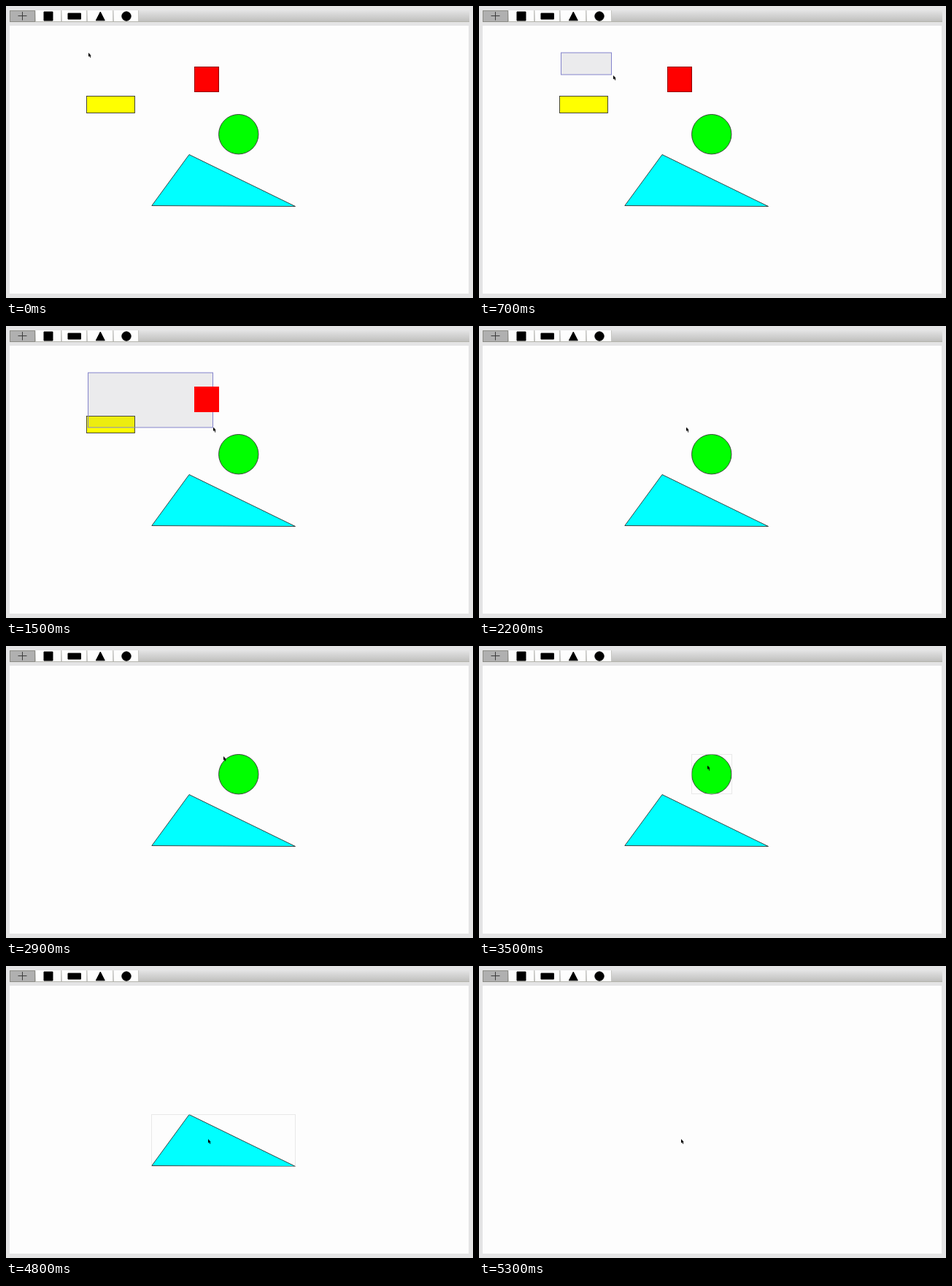
Recreate the animation shown at these times as an HTML page. Size 640x400 px, loop 5500 ms.

```html
<!DOCTYPE html>
<html lang="en">
<head>
<meta charset="utf-8">
<title>Shape editor</title>
<style>
html, body { margin: 0; width: 100%; height: 100%; overflow: hidden; background: #e4e4e5; }
svg { display: block; width: 640px; height: 400px; }

.shape { stroke: #333; stroke-width: .9; }
.frame { fill: none; stroke: #d4d4d4; stroke-dasharray: 1 1; }
.band { fill: rgba(110, 110, 120, .12); stroke: #8484cc; }

/* Every change is a hard step on a 100 ms grid. */
.anim { animation: 5500ms step-end infinite; }
#cursor { animation-name: move; }
#band { animation-name: drag; }
#redEdge { animation-name: edge; }
#pair { animation-name: pair; }
#pairFrames { animation-name: pairFrames; }
#disc { animation-name: disc; }
#discFrame { animation-name: discFrame; }
#tri { animation-name: tri; }
#triFrame { animation-name: triFrame; }

@keyframes move {
  0%     { transform: translate(113px, 64px); }
  7.27%  { transform: translate(115px, 65px); }
  9.09%  { transform: translate(127px, 70px); }
  10.9%  { transform: translate(152px, 81px); }
  12.72% { transform: translate(184px, 95px); }
  14.54% { transform: translate(217px, 109px); }
  16.36% { transform: translate(246px, 122px); }
  18.18% { transform: translate(269px, 132px); }
  20%    { transform: translate(280px, 137px); }
  21.81% { transform: translate(284px, 138.5px); }
  49.09% { transform: translate(285px, 140px); }
  50.9%  { transform: translate(290px, 144px); }
  52.72% { transform: translate(298px, 151px); }
  54.54% { transform: translate(306px, 158px); }
  56.36% { transform: translate(311px, 162px); }
  58.18% { transform: translate(313px, 163.5px); }
  74.54% { transform: translate(309px, 174px); }
  76.36% { transform: translate(300px, 196px); }
  78.18% { transform: translate(290px, 215px); }
  80%    { transform: translate(281px, 230px); }
  81.81% { transform: translate(278px, 236px); }
  83.63%, 100% { transform: translate(277px, 237px); }
}
@keyframes drag {
  0%     { visibility: hidden; width: 0; height: 0; }
  7.27%  { visibility: visible; width: 1px; height: 1px; }
  9.09%  { visibility: visible; width: 12px; height: 5px; }
  10.9%  { visibility: visible; width: 37px; height: 16px; }
  12.72% { visibility: visible; width: 69px; height: 30px; }
  14.54% { visibility: visible; width: 102px; height: 44px; }
  16.36% { visibility: visible; width: 131px; height: 57px; }
  18.18% { visibility: visible; width: 154px; height: 67px; }
  20%    { visibility: visible; width: 166px; height: 72px; }
  21.81% { visibility: visible; width: 171px; height: 75px; }
  29.09%, 100% { visibility: hidden; width: 0; height: 0; }
}
@keyframes edge { 0% { stroke: #900000; } 18.18%, 100% { stroke: #f00; } }
@keyframes pair { 0% { opacity: 1; } 40%, 100% { opacity: 0; } }
@keyframes pairFrames { 0% { opacity: 0; } 29.09% { opacity: 1; } 40%, 100% { opacity: 0; } }
@keyframes disc { 0% { opacity: 1; } 70.9%, 100% { opacity: 0; } }
@keyframes discFrame { 0% { opacity: 0; } 63.63%, 100% { opacity: 1; } }
@keyframes tri { 0% { opacity: 1; } 96.36%, 100% { opacity: 0; } }
@keyframes triFrame { 0% { opacity: 0; } 83.63%, 100% { opacity: 1; } }
</style>
</head>
<body>
<svg viewBox="0 0 640 400">
  <defs>
    <linearGradient id="bar" x2="0" y2="1">
      <stop offset="0" stop-color="#e6e6e7"/>
      <stop offset="1" stop-color="#bdbdbb"/>
    </linearGradient>
  </defs>

  <rect width="640" height="400" fill="#e4e4e5"/>
  <rect x="5" y="5" width="630" height="17" fill="url(#bar)"/>
  <path d="M5 21.5H635" stroke="#b4b4ac"/>
  <rect x="5" y="27" width="629" height="367" fill="#fdfdfd"/>

  <!-- Toolbar -->
  <rect x="5.5" y="6.5" width="34" height="15" fill="#b0b0b0" stroke="#8c8c86"/>
  <g fill="#fdfdfd">
    <rect x="41" y="6" width="34" height="15"/>
    <rect x="77" y="6" width="33" height="15"/>
    <rect x="112" y="6" width="34" height="15"/>
    <rect x="148" y="6" width="33" height="15"/>
  </g>
  <path d="M75.5 6V21M110.5 6V21M146.5 6V21M181.5 6V21" stroke="#c6c6c2"/>
  <path d="M16.5 13.5H28.5M22.5 8V19.5" stroke="#3c3c3c"/>
  <g stroke="#000">
    <path d="M52 8h12v12H52zM85 10h17.500v8H85zM129.300 8l6 11.800h-12z"/>
    <circle cx="165" cy="14" r="6.200"/>
  </g>

  <!-- Drawing area -->
  <g id="tri" class="anim">
    <path class="shape" d="M251 203.500L199.800 273.500L396.500 274.500z" fill="#0ff"/>
    <rect id="triFrame" class="frame anim" x="199.500" y="203.500" width="197" height="71"/>
  </g>
  <g id="disc" class="anim">
    <circle class="shape" cx="318.750" cy="175.700" r="27.200" fill="#0f0"/>
    <rect id="discFrame" class="frame anim" x="291.500" y="148.500" width="55" height="54"/>
  </g>
  <g id="pair" class="anim">
    <rect class="shape" x="110.500" y="123.500" width="66" height="23" fill="#ff0"/>
    <rect id="band" class="band anim" x="112.500" y="64" width="0" height="0"/>
    <rect id="redEdge" class="anim" x="258.500" y="83.500" width="33" height="34" fill="#f00"/>
    <g id="pairFrames" class="frame anim">
      <rect x="110.500" y="123.500" width="66" height="23"/>
      <rect x="258.500" y="83.500" width="33" height="34"/>
    </g>
  </g>

  <path id="cursor" class="anim" d="M0 0V5.400L1.300 4.500L2.400 6.700L3.400 6.200L2.400 4.200H3.900z"/>
</svg>
</body>
</html>
```
